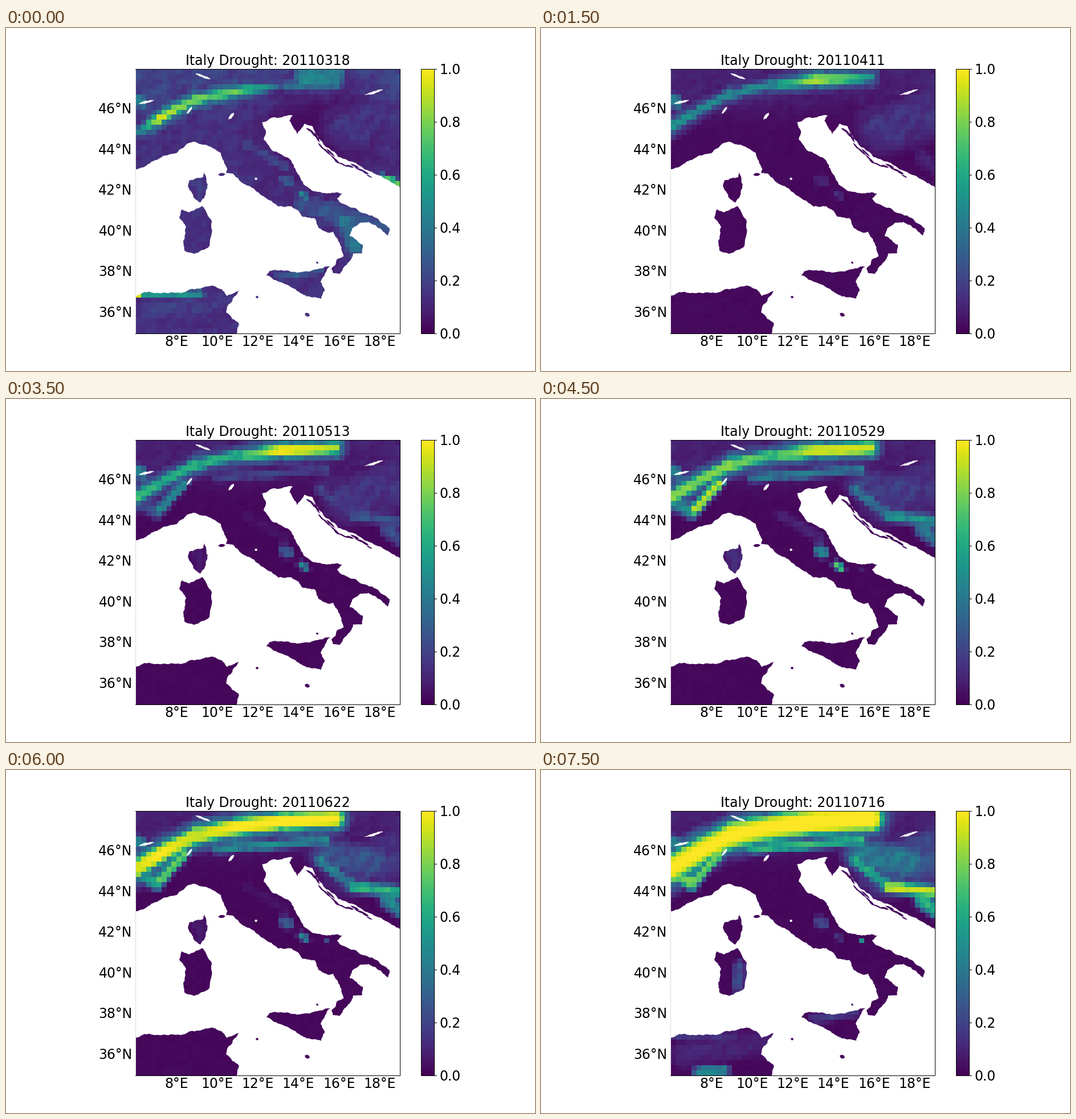
A matplotlib script that plays this animation: 928x603 px, repeating every 8000 ms.

```python
import numpy as np
import matplotlib.pyplot as plt
from matplotlib.animation import FuncAnimation
from matplotlib.patches import Polygon
from matplotlib.path import Path

W, H, DPI = 928, 603, 64
L, R, T, B = 227.5, 691.5, 72.5, 537.5
N, FRAMES = 52, 16
FONT = 23.5 * 72 / DPI
rng = np.random.default_rng(4)


# ---------------------------------------------------------------- coastline
def pts(*v):
    return np.array(v, float).reshape(-1, 2)


def rough(p):
    """Make a coarse coast ragged by midpoint displacement."""
    for k in (.03, .07, .1):
        d = np.diff(p, axis=0)
        off = k * rng.uniform(-1.5, 1.5, (len(d), 1))
        out = np.empty((2 * len(p) - 1, 2))
        out[::2] = p
        out[1::2] = (p[:-1] + p[1:]) / 2 + off * np.c_[-d[:, 1], d[:, 0]]
        p = out
    return p


def ring(*v):
    p = pts(*v)
    return rough(np.vstack([p, p[:1]]))


def sliver(x0, y0, x1, y1, w):
    """A narrow lens along a line, for small islands and lakes."""
    a, b = np.array([x0, y0]), np.array([x1, y1])
    d = b - a
    n = np.array([-d[1], d[0]]) / np.hypot(*d) * w / 2
    return np.array([a, a + d * .3 + n, a + d * .7 + n, b,
                     a + d * .7 - n, a + d * .3 - n, a])


west = pts(227, 248, 247, 241, 260, 233, 273, 227, 299, 220, 318, 203, 328, 200,
           348, 205, 376, 219, 381, 232, 388, 248, 386, 255, 398, 256, 410, 269,
           430, 280, 466, 304, 478, 314, 500, 313, 513, 321, 519, 331, 542, 335,
           548, 351, 566, 360, 574, 358, 586, 381, 592, 402, 580, 407, 578, 417,
           571, 422, 574, 431)
east = pts(586, 432, 595, 418, 604, 408, 610, 396, 625, 396, 626, 381, 603, 366,
           607, 353, 622, 342, 636, 341, 656, 352, 670, 365, 673, 352, 650, 334,
           617, 320, 588, 308, 581, 300, 590, 291, 562, 291, 540, 287, 522, 275,
           511, 255, 501, 234, 470, 217, 452, 196, 456, 184, 449, 166, 472, 157,
           503, 154, 497, 163, 511, 187)
dalmatia = pts(524, 168, 538, 173, 550, 196, 583, 227, 610, 236, 642, 253,
               673, 269, 692, 281)
africa = pts(227, 472, 243, 464, 268, 466, 302, 465, 335, 458, 360, 453,
             378, 459, 388, 471, 408, 462, 388, 490, 386, 500, 409, 521, 404, 538)

shapes = [
    np.vstack([rough(np.vstack([west, east, dalmatia])),
               pts(720, 281, 720, 50, 200, 50, 200, 248)]),
    np.vstack([rough(africa), pts(404, 560, 200, 560, 200, 472)]),
    # Corsica, Sardinia, Sicily
    ring(348, 251, 354, 275, 350, 293, 341, 307, 330, 299, 319, 277, 322, 268,
         346, 262),
    ring(345, 313, 361, 340, 357, 383, 330, 397, 313, 391, 311, 377, 316, 350,
         304, 333, 308, 319, 322, 324),
    ring(457, 435, 463, 427, 484, 426, 510, 430, 545, 424, 569, 419, 552, 446,
         559, 461, 553, 476, 528, 472, 505, 458, 476, 445),
    sliver(372, 258, 385, 257, 5), sliver(524, 502, 533, 506, 6),
    sliver(438, 472, 443, 474, 4), sliver(544, 411, 548, 414, 3)]

# Island chain parallel to the Dalmatian shore
for x in np.linspace(526, 632, 16):
    size, gap = rng.uniform(9, 17), rng.uniform(4, 11)
    y0, y1 = np.interp([x, x + size], *dalmatia.T) + gap
    shapes.append(sliver(x, y0, x + size, y1, rng.uniform(2, 3.5)))

land = Path.make_compound_path(
    *[Path(np.vstack([p, p[:1]]), closed=True) for p in shapes])
lakes = [sliver(233, 133, 260, 127, 4), sliver(332, 80, 359, 90, 4),
         sliver(327, 138, 317, 151, 4), sliver(400, 149, 390, 161, 5),
         sliver(629, 118, 662, 108, 4), sliver(436, 265, 441, 265, 4)]

# ------------------------------------------------------------------ dryness
gx, gy = np.meshgrid(L + (np.arange(N) + .5) * (R - L) / N,
                     T + (np.arange(N) + .5) * (B - T) / N)
grain = rng.normal(size=(N, N))
grain = np.clip(grain + np.roll(grain, 1, 0) + np.roll(grain, 1, 1), -3, 3) / 3


def bump(d, r, p=3):
    return np.exp(-(d / r) ** p)


def seasons(i):
    return dict(always=1, spring=np.exp(-i), june=np.exp(-((i - 9.5) / 3) ** 2),
                summer=(i / 15) ** 3, late=(i / 15) ** 12)


def streak(x0, y0, x1, y1, r, **peaks):
    """A dry strip along a line, with its peak in each season."""
    dx, dy = x1 - x0, y1 - y0
    s = np.clip(((gx - x0) * dx + (gy - y0) * dy) / (dx * dx + dy * dy), 0, 1)
    return bump(np.hypot(gx - x0 - s * dx, gy - y0 - s * dy), r), peaks


streaks = [
    streak(232, 124, 238, 132, 11, always=.45),                # Lake Geneva
    streak(600, 175, 680, 150, 50, always=.15, late=.1),       # Pannonia
    streak(560, 145, 650, 165, 32, june=.1, summer=.4),
    streak(268, 196, 312, 148, 10, june=.75, summer=.75),      # western Alps
    streak(236, 185, 264, 200, 13, june=.3, summer=.75),
    streak(370, 139, 560, 124, 10, spring=.1, june=.25, summer=.62),
    streak(550, 160, 606, 203, 11, june=.25, summer=.58),      # Dinaric Alps
    streak(608, 207, 690, 214, 11, june=.3, summer=.9),
    streak(668, 230, 691, 246, 14, always=.1, june=.2, summer=.55),
    streak(662, 262, 691, 275, 7, spring=.7),
    streak(520, 88, 578, 84, 20, spring=.46),
    streak(420, 205, 490, 245, 11, spring=.2, june=.1),        # Apennines
    streak(488, 266, 494, 270, 11, always=.1, spring=.2, june=.4, late=.12),
    streak(517, 291, 527, 299, 7, always=.1, spring=.3, june=.6),
    streak(562, 300, 563, 300, 5, summer=.56),
    streak(520, 312, 665, 352, 24, spring=.26),                # the south
    streak(595, 340, 614, 385, 20, spring=.36),
    streak(480, 436, 550, 425, 11, spring=.28, late=.17),
    streak(348, 345, 346, 382, 11, spring=.16, late=.26),
    streak(338, 275, 340, 290, 18, spring=.2, june=.15),
    streak(232, 469, 340, 469, 9, spring=.52, late=.15),       # Africa
    streak(229, 470, 232, 470, 6, spring=.95),
    streak(250, 500, 390, 480, 26, spring=.18, late=.1),
    streak(275, 531, 322, 528, 10, late=.45)]

# Alpine arc: strength at six stations, west to east, on the key dates
arc = pts(232, 172, 270, 148, 330, 116, 400, 101, 480, 91, 578, 86)
keys = [0, 2, 5, 7, 10, 12, 15]
strength = np.array([
    [.40, .95, .75, .80, .30, .45],
    [.35, .38, .38, .45, 1.0, .60],
    [.90, .50, .50, .50, .70, .50],
    [.70, .55, .60, .60, 1.0, .90],
    [.90, .85, .90, .70, .90, .95],
    [.95, 1.0, .90, 1.0, 1.0, 1.0],
    [1.0, 1.0, 1.0, 1.0, 1.05, 1.02]])


def alps(i, drop):
    xs, ys = arc.T
    slope = np.interp(gx, xs, np.gradient(ys, xs))
    across = (gy - np.interp(gx, xs, ys) - drop) / np.hypot(1, slope)
    d = np.hypot(across, np.maximum(gx - xs[-1], 0))
    now = [np.interp(i, keys, column) for column in strength.T]
    r = 9 + 3 * i / 15 + 13 * (i / 15) ** 4
    return np.interp(gx, xs, now) * np.maximum(bump(d, r, 4),
                                               .5 * bump(d, r + 11))


def dryness(i):
    now = seasons(i)
    veneto = bump(np.hypot(gx - 545, gy - 165), 100)
    v = .02 + .11 * now["spring"] * (1 - veneto) + .07 * bump(gy - T, 75)
    v = np.maximum(v, alps(i, 11 * now["spring"]))
    for shape, peaks in streaks:
        v = np.maximum(v, shape * sum(p * now[k] for k, p in peaks.items()))
    return np.clip(v * (1 + .3 * grain * (1 - np.clip(v, 0, 1))), 0, 1)


# ------------------------------------------------------------------ drawing
fig = plt.figure(figsize=(W / DPI, H / DPI), dpi=DPI, facecolor="white")
ax = fig.add_axes([0, 0, 1, 1])
ax.axis("off")


def line(xs, ys, color="black", z=4):
    ax.plot(xs, ys, color=color, lw=72 / DPI, zorder=z, snap=False,
            solid_capstyle="projecting", solid_joinstyle="miter")


def label(x, y, s, ha="center"):
    return ax.text(x, y, s, ha=ha, va="baseline", fontsize=FONT,
                   family="DejaVu Sans", color="black")


def raster(data, x0, x1):
    return ax.imshow(data, extent=(x0, x1, B, T), vmin=0, vmax=1, zorder=1,
                     cmap="viridis", interpolation="nearest", aspect="auto")


image = raster(dryness(0), L, R)
image.set_clip_path(land, transform=ax.transData)
for p in lakes:
    ax.add_patch(Polygon(rough(p), facecolor="white", lw=0, zorder=2))
line([L, L], [T, B], "#dddddd", 0)
line([L, R, R, L], [T, T, B, B])

raster(np.linspace(1, 0, 256)[:, None], 728.5, 751.5)
line([728.5, 751.5, 751.5, 728.5, 728.5], [T, T, B, B, T])

for k in range(6):
    y = round(B - k * (B - T) / 5 - .5) + .5
    line([752, 755.5], [y, y])
    label(760.5, y + 8.5, f"{k / 5:.1f}", "left")
    label(221.5, 150.5 + 71.4 * k, f"{46 - 2 * k}°N", "right")
    label(298.8 + 71.4 * k, 559, f"{8 + 2 * k}°E")

title = label(459.5, 65.5, "")
ax.set_xlim(0, W)
ax.set_ylim(H, 0)


def update(i):
    day = np.datetime64("2011-03-18") + 8 * i
    title.set_text("Italy Drought: " + str(day).replace("-", ""))
    image.set_data(dryness(i))
    return image, title


anim = FuncAnimation(fig, update, frames=FRAMES, interval=500, repeat=True,
                     repeat_delay=0, blit=False)
plt.show()
```
